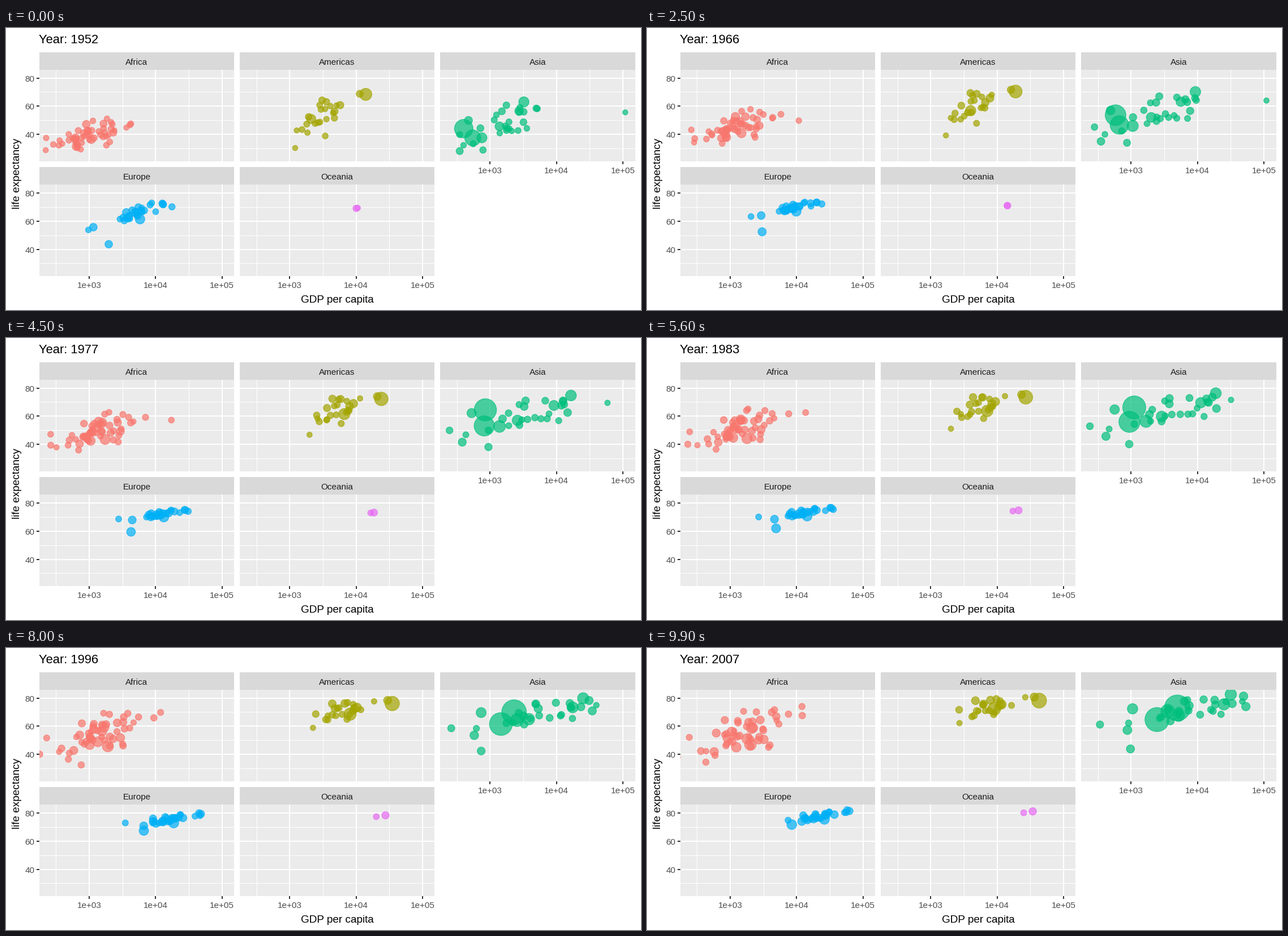
Write a matplotlib script that moves like this. It is 1122 by 499 pixels and loops after 10000 ms.

```python
import matplotlib.pyplot as plt
import numpy as np
from matplotlib.animation import FuncAnimation
from matplotlib.patches import Rectangle

W, H, DPI = 1122, 499, 100
PT = 72 / DPI  # points per pixel
FRAMES, INTERVAL = 100, 100
FIRST, LAST = 1952, 2007
DECADE, LIFE_STEP = 117.3, 2.486  # pixels per power of ten / per year of life
ROW_STEP, COL_STEP = 203.5, 354.25
MAX_POP = 1318.7  # millions
DRIFT = 0.6  # how far, as an angle, a country wanders within its cloud

times = np.linspace(FIRST, LAST, FRAMES)
progress = np.linspace(0, 1, FRAMES)[:, None]
rng = np.random.default_rng(12)

plt.rcParams["font.family"] = "Liberation Sans"
fig = plt.figure(figsize=(W / DPI, H / DPI), dpi=DPI, facecolor="white")
ax = fig.add_axes([0, 0, 1, 1])
ax.set(xlim=(0, W), ylim=(H, 0))
ax.axis("off")


def box(x0, y0, x1, y1, color):
    return ax.add_patch(Rectangle((x0, y0), x1 - x0, y1 - y0, fc=color, lw=0))


def line(x0, y0, x1, y1, width=2, color="white"):
    ax.plot([x0, x1], [y0, y1], color=color, lw=width * PT,
            solid_capstyle="butt", snap=True)


def text(x, y, s, size=15.3, color="#4D4D4D", ha="center", va="baseline", **kw):
    return ax.text(x, y, s, fontsize=size * PT, color=color, ha=ha, va=va, **kw)


def spread(n):
    """Standard scores, without extremes, that drift slowly over the loop."""
    ends = rng.normal(size=(2, n)).clip(-2, 2)
    ends = (ends - ends.mean(1, keepdims=True)) / ends.std(1, keepdims=True)
    angle = DRIFT * progress
    return np.cos(angle) * ends[0] + np.sin(angle) * ends[1]


def cloud(n, median_pop, growth, link, *keys):
    """Countries scattered around a moving centre.

    Keys hold year, mean log gdp, its spread, mean life, its spread;
    link is the correlation of life with gdp.
    """
    years, *curves = np.array(keys).T
    gdp, gdp_sd, life, life_sd = (np.interp(times, years, c)[:, None] for c in curves)
    wealth, health = spread(n), spread(n)
    logs = gdp + gdp_sd * wealth
    lives = life + life_sd * (link * wealth + np.sqrt(1 - link ** 2) * health)
    pops = median_pop * np.exp(1.1 * rng.normal(size=n).clip(-2, 1.8))
    return logs, np.minimum(lives, 82.2), pops * (1 + (growth - 1) * progress)


def path(pop, last_pop, *keys):
    """One country that stands out; keys hold year, gdp, life."""
    years, gdp, life = np.array(keys).T
    logs = np.interp(times, years, np.log10(gdp))
    lives = np.interp(times, years, life)
    return logs[:, None], lives[:, None], pop + (last_pop - pop) * progress


def draw_panel(name, col, row, color, *groups):
    left, right = ((59, 403), (413, 757), (767, 1112))[col]
    top, bottom = 43 + 203 * row, 236 + 203 * row

    def x_of(log_gdp):
        return 147 + COL_STEP * col + DECADE * (log_gdp - 3)

    def y_of(life):
        return 88.6 + ROW_STEP * row + LIFE_STEP * (80 - life)

    box(left, top, right, top + 31, "#D9D9D9")
    text((left + right) / 2, top + 22, name, color="#1A1A1A")
    panel = box(left, top + 31, right, bottom, "#EBEBEB")

    for life in (70, 50, 30):
        line(left, y_of(life), right, y_of(life), 1)
    for power in (2.5, 3.5, 4.5):
        line(x_of(power), top + 31, x_of(power), bottom, 1)
    for life in (80, 60, 40):
        y = y_of(life)
        line(left, y, right, y)
        if col == 0:
            line(left - 5, y, left, y, color="#333333")
            text(left - 8.5, y + 6, str(life), ha="right")
    for power in (3, 4, 5):
        x = x_of(power)
        line(x, top + 31, x, bottom)
        if row == 1 or col == 2:
            line(x, bottom, x, bottom + 5, color="#333333")
            text(x, bottom + 21, f"1e+0{power}")

    logs, lives, pops = (np.hstack(part) for part in zip(*groups))
    radii = 4.3 + 18.55 * np.sqrt(pops / MAX_POP)
    dots = ax.scatter([], [], fc=color, ec=color, alpha=0.7, lw=1.23 * PT, zorder=3)
    dots.set_clip_path(panel)
    spots = np.stack([x_of(logs), y_of(lives)], axis=-1)
    return dots, spots, (2 * radii * PT) ** 2


panels = [
    draw_panel(
        "Africa", 0, 0, "#F8766D",
        path(33, 135, (1952, 1077, 36.3), (1972, 1698, 42.8), (2007, 2014, 46.9)),
        path(2.5, 8.9, (1952, 493, 40), (1982, 882, 46.2), (1992, 737, 23.6),
             (2002, 786, 43.4), (2007, 863, 46.2)),
        path(1, 6, (1952, 2388, 42.7), (1972, 21011, 52.8), (1987, 11770, 66),
             (2007, 12057, 74)),
        cloud(49, 3.5, 3.5, 0.45,
              (1952, 3.00, 0.30, 39.2, 5.0), (1972, 3.13, 0.32, 47.8, 5.8),
              (1992, 3.12, 0.38, 54.0, 7.5), (2007, 3.20, 0.44, 55.0, 9.4))),
    draw_panel(
        "Americas", 1, 0, "#A3A500",
        path(157.6, 301, (1952, 13990, 68.4), (1972, 21806, 71.3), (2007, 42952, 78.2)),
        path(14.8, 33.4, (1952, 11367, 68.8), (1972, 18971, 72.9), (2007, 36319, 80.7)),
        path(56.6, 190, (1952, 2109, 50.9), (1977, 6660, 61.5), (2007, 9066, 72.4)),
        cloud(22, 3.6, 2.8, 0.65,
              (1952, 3.46, 0.19, 51.8, 8.2), (1972, 3.68, 0.20, 61.8, 6.6),
              (1992, 3.74, 0.24, 69.3, 4.2), (2007, 3.86, 0.27, 73.2, 4.0))),
    draw_panel(
        "Asia", 2, 0, "#00BF7D",
        path(8.4, 31.9, (1952, 779, 28.8), (1982, 978, 39.9), (1992, 649, 41.7),
             (2007, 975, 43.8)),
        path(556, 1318.7, (1952, 400, 44), (1961, 515, 46), (1972, 677, 63.1),
             (1992, 1656, 68.7), (2007, 4959, 73)),
        path(372, 1110, (1952, 547, 37.4), (1972, 724, 50.7), (1992, 1164, 60.2),
             (2007, 2452, 64.7)),
        path(82, 223.5, (1952, 750, 37.5), (1977, 1383, 52.7), (2007, 3541, 70.7)),
        path(86.5, 127.5, (1952, 3217, 63), (1972, 14779, 73.4), (2007, 31656, 82.6)),
        path(0.2, 2.5, (1952, 108382, 55.6), (1972, 109348, 67.7), (1982, 31354, 71.3),
             (2007, 47307, 77.6)),
        cloud(27, 6.5, 3.2, 0.65,
              (1952, 3.19, 0.33, 47.5, 8.3), (1972, 3.47, 0.45, 58.0, 7.8),
              (1992, 3.66, 0.48, 67.2, 5.8), (2007, 3.86, 0.47, 71.3, 5.4))),
    draw_panel(
        "Europe", 0, 1, "#00B0F6",
        path(22.2, 71.2, (1952, 1969, 43.6), (1977, 4269, 59.5), (2007, 8458, 71.8)),
        path(2.8, 4.6, (1952, 974, 53.8), (1972, 2860, 67.5), (1992, 2547, 72.2),
             (2007, 7446, 74.9)),
        cloud(28, 9, 1.25, 0.85,
              (1952, 3.74, 0.24, 66.0, 4.2), (1972, 4.07, 0.18, 71.3, 1.7),
              (1992, 4.17, 0.25, 74.6, 2.7), (2007, 4.38, 0.22, 78.0, 2.5))),
    draw_panel(
        "Oceania", 1, 1, "#E76BF3",
        path(8.7, 20.4, (1952, 10040, 69.1), (1972, 16789, 71.9), (2007, 34435, 81.2)),
        path(2, 4.1, (1952, 10557, 69.4), (1972, 16046, 71.9), (1992, 18363, 76.3),
             (2007, 25185, 80.2))),
]
title = text(58.5, 27, "", 22, "black", "left")
text(585, 486, "GDP per capita", 19, "black")
text(19.5, 257, "life expectancy", 19, "black", va="center", rotation=90)


def update(i):
    title.set_text(f"Year: {round(times[i])}")
    for dots, spots, areas in panels:
        dots.set_offsets(spots[i])
        dots.set_sizes(areas[i])
    return []


anim = FuncAnimation(fig, update, frames=FRAMES, interval=INTERVAL,
                     init_func=lambda: update(0), repeat=True, repeat_delay=0)
plt.show()
```
